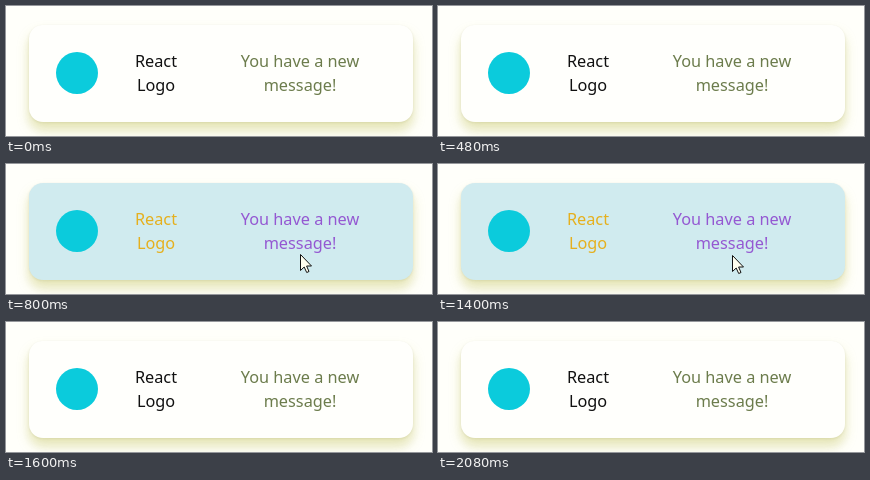
Write an HTML page that moves like this. It is 426 px wide and 130 px high and loops after 2.4 s.

```html
<!DOCTYPE html>
<html lang="en">
<head>
<meta charset="utf-8">
<style>
  html, body { margin: 0; width: 100%; height: 100%; overflow: hidden; background: #fffffa; }
  svg { display: block; width: 426px; height: 130px; }
  text { font: 16.3px "Noto Sans", "Open Sans", sans-serif; text-anchor: middle; }
  .card { fill: #fffffc; filter: drop-shadow(0 8px 6px #b4b41c48) drop-shadow(0 1px 1px #60603028); }
  .title { fill: #111; }
  .note { fill: #6c7c4c; }
  .cursor { visibility: hidden; }
  .hover .card { fill: #d0ebef; }
  .hover .title { fill: #e5b01e; }
  .hover .note { fill: #9458d2; }
  .hover .cursor { visibility: visible; }
</style>
</head>
<body>
<svg id="stage" viewBox="0 0 426 130">
  <rect class="card" x="23" y="19" width="384" height="97" rx="14"/>
  <circle cx="71" cy="67" r="21" fill="#0bcbdc"/>
  <g class="title">
    <text x="150" y="61">React</text>
    <text x="150" y="85">Logo</text>
  </g>
  <g class="note">
    <text x="294" y="61">You have a new</text>
    <text x="294" y="85">message!</text>
  </g>
  <path class="cursor" id="cursor" fill="#fffff0" stroke="#111"
        d="M.5 .5V16.5L4.2 13L6.7 18.5L9 17.5L6.6 12H11.5Z"/>
</svg>
<script>
  const LOOP = 2400, ENTER = 800, NUDGE = 1400, LEAVE = 1600;
  const stage = document.getElementById("stage");
  const cursor = document.getElementById("cursor");
  const start = performance.now();

  function draw() {
    const t = (performance.now() - start) % LOOP;
    stage.classList.toggle("hover", t >= ENTER && t < LEAVE);
    cursor.setAttribute("transform", `translate(294 ${t < NUDGE ? 90 : 91})`);
    requestAnimationFrame(draw);
  }
  draw();
</script>
</body>
</html>
```
